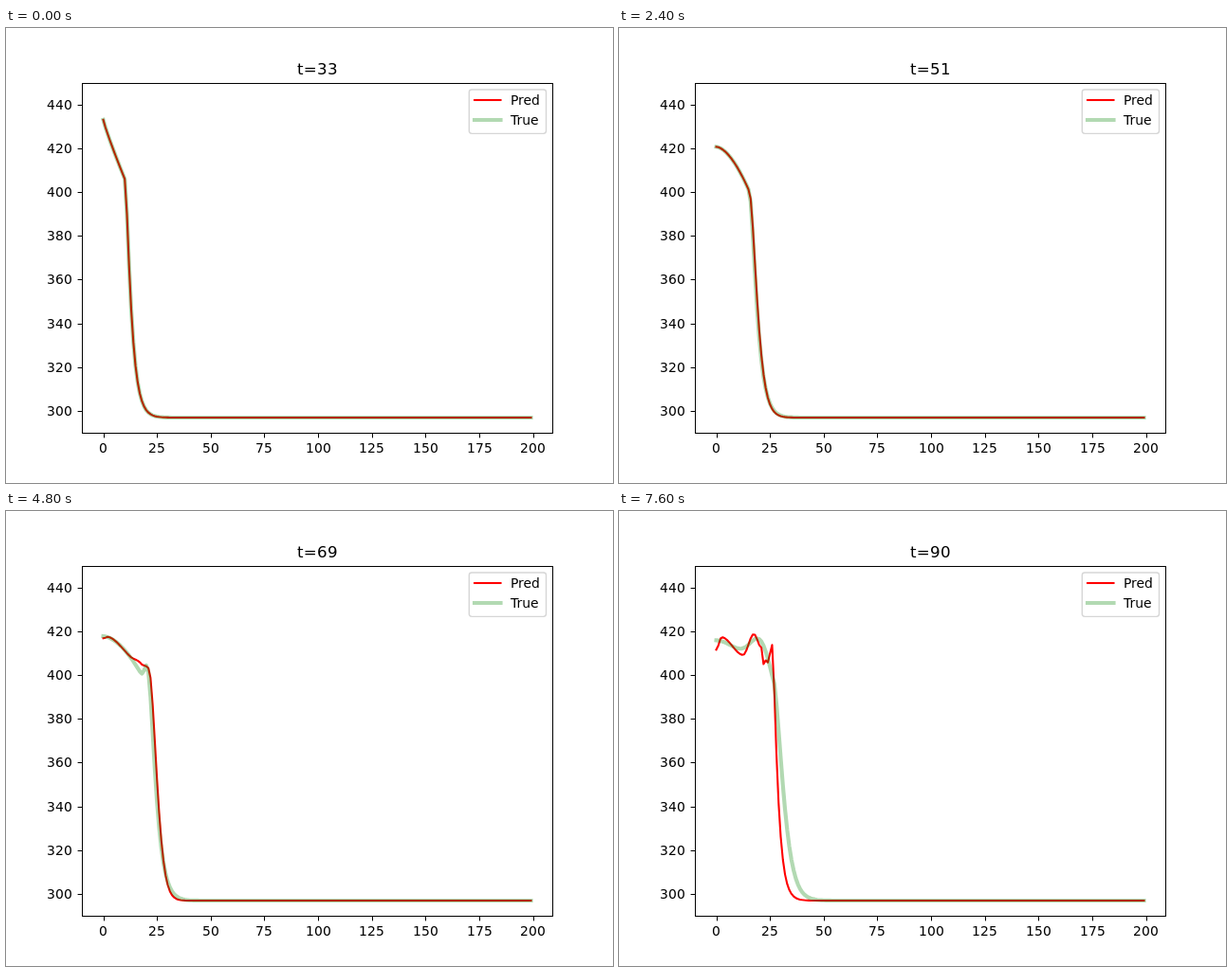
An HTML page that plays this animation: 640x480 px, repeating every 8 s.

```html
<!DOCTYPE html>
<html>
<head>
<meta charset="utf-8">
<style>
html, body { margin: 0; width: 100%; height: 100%; overflow: hidden; background: #fff; }
svg { display: block; }
text { font: 13.89px "DejaVu Sans", sans-serif; }
#ticks text { letter-spacing: .16px; }
#title { font-size: 16.67px; letter-spacing: .3px; }
.line { fill: none; stroke-linecap: square; stroke-linejoin: round; }
.pred { stroke: #f00; stroke-width: 2.08; }
.true { stroke: #008000; stroke-width: 4.17; stroke-opacity: .3; }
.axis { fill: none; stroke: #000; stroke-width: 1; }
</style>
</head>
<body>
<svg width="640" height="480">
  <path id="pred" class="line pred"/>
  <path id="true" class="line true"/>
  <rect class="axis" x="80.5" y="58.5" width="496" height="369"/>
  <g id="ticks"></g>
  <text id="title" x="307" y="49"></text>
  <rect x="488.3" y="65" width="81.2" height="46.4" rx="2.8" fill="#fff" fill-opacity=".8" stroke="#ccc" stroke-opacity=".8" stroke-width="1.39"/>
  <path class="line pred" d="M494 76H521.5"/>
  <path class="line true" d="M494 97H521.5"/>
  <text x="532" y="81">Pred</text>
  <text x="532" y="102">True</text>
</svg>
<script>
const $ = id => document.getElementById(id);
const px = x => 102.545 + x * 450.909 / 199;
const py = y => 427.2 - (y - 290) * 2.31;
const clamp = v => Math.min(1, Math.max(0, v));
const mix = (a, b, p) => a + (b - a) * p;
const { exp, sqrt, min, max } = Math;

const ambient = 297;

// Jagged plateau of the prediction after reignition: x, height at t=75, height at t=90.
const plateau = [
  [0, 414, 411.6], [2.5, 418.2, 417.3], [12.5, 408, 409.2],
  [17.5, 416.8, 418.8], [21, 426.4, 412.5], [22, 419.3, 405],
  [23, 424.4, 406.7], [24, 422.8, 405.8], [26, 416.8, 413.8]
];

function jagged(x, p) {
  let i = 0;
  while (i < plateau.length - 2 && x > plateau[i + 1][0]) i++;
  const [a, b] = [plateau[i], plateau[i + 1]];
  const u = clamp((x - a[0]) / (b[0] - a[0]));
  return mix(mix(a[1], a[2], p), mix(b[1], b[2], p), u * u * (3 - 2 * u));
}

// A hot top up to x = edge, then a decay to ambient that steepens over a distance `round`.
const profile = (top, edge, rate, round) => x => {
  if (x <= edge) return top(x);
  const u = x - edge;
  return ambient + (top(edge) - ambient) * exp(-rate * u * u / (u + round));
};

function curves(t) {
  const d = t - 33;
  const age = max(0, t - 75);            // time since reignition
  const lit = clamp((t - 63) / 12) ** 2; // the front stalls, then reignites

  const left = 413.8 + 11.7 * exp(-d / 33) + 7.5 * exp(-d / 4);
  const shoulder = 406 - .3 * d;
  const bend = 1.75 - .85 * exp(-d / 6);
  const slope = edge => x => left - (left - shoulder) * (x / edge) ** bend;

  const slowEdge = 10 + .45 * d ** .85;
  const slowRound = .13 * (t - 21);

  const edge = mix(slowEdge, min(26, 24 + .22 * age), lit);
  const center = edge - .4 - .3 * age;
  const width = sqrt(max(1, 1.12 * (t - 68.5)));
  const hump = x => lit * (33 - age) * exp(-(((x - center) / width) ** 2) / 2);
  const base = slope(edge);
  const truth = profile(x => base(x) + hump(x), edge, .4,
    mix(slowRound, .2 + .65 * age, lit));

  const drift = min(1, d / 30) ** 3;     // the prediction's tail shortens
  const predEdge = mix(slowEdge, 26, lit);
  const predBase = slope(predEdge);
  const settle = 1 - (1 - age / 15) ** 1.6;
  const pred = profile(x => mix(predBase(x), jagged(x, settle), lit), predEdge,
    mix(.4 + .5 * drift, .45 + .3 * exp(-age / 5), lit),
    mix(slowRound + 15.5 * drift, .6 + .05 * age, lit));

  return { pred, true: truth };
}

const toPath = f => "M" + Array.from({ length: 200 },
  (_, x) => px(x).toFixed(2) + " " + py(f(x)).toFixed(2)).join("L");

let ticks = "";
const snap = v => Math.round(v - .01);
for (let v = 0; v <= 200; v += 25)
  ticks += `<path class="axis" d="M${snap(px(v)) + .5} 427.5v4.9"/>
    <text x="${snap(px(v) - 4.5 * String(v).length)}" y="448">${v}</text>`;
for (let v = 300; v <= 440; v += 20)
  ticks += `<path class="axis" d="M80.5 ${snap(py(v)) + .5}h-4.9"/>
    <text x="43" y="${snap(py(v)) + 5}">${v}</text>`;
$("ticks").innerHTML = ticks;

let shown;
function draw(now) {
  const t = 33 + 3 * Math.floor(now % 8000 / 400);
  if (t !== shown) {
    shown = t;
    $("title").textContent = "t=" + t;
    for (const [id, f] of Object.entries(curves(t))) $(id).setAttribute("d", toPath(f));
  }
  requestAnimationFrame(draw);
}
draw(performance.now());
</script>
</body>
</html>
```
